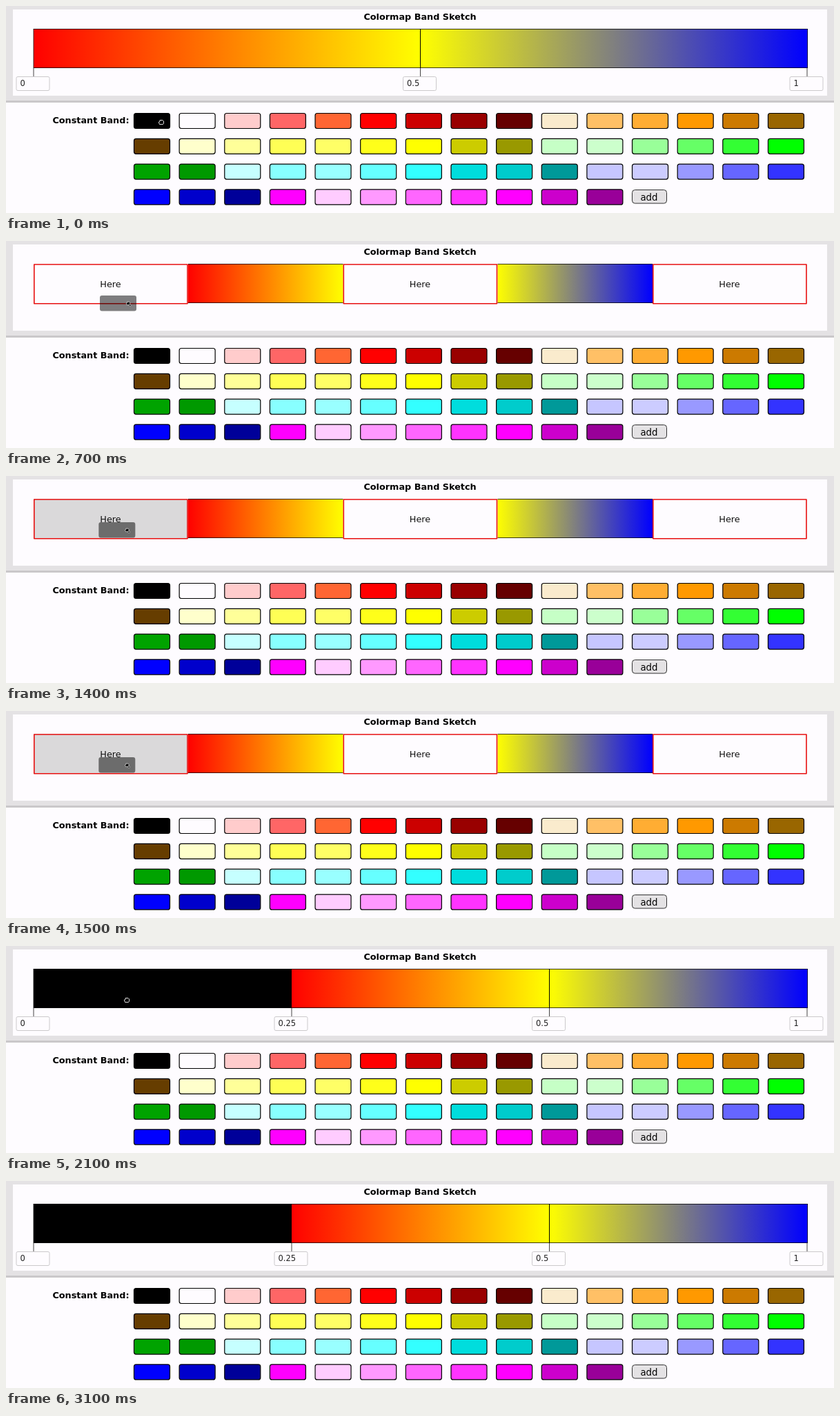
Write an HTML page with a canvas that moves like this. It is 1200 by 300 pixels and loops after 3.2 s.

```html
<!DOCTYPE html>
<html lang="en">
<head>
<meta charset="utf-8">
<title>Colormap Band Sketch</title>
<style>
html, body { margin: 0; width: 100%; height: 100%; overflow: hidden; background: #fefcff; }
canvas { display: block; }
</style>
</head>
<body>
<canvas id="stage" width="1200" height="300"></canvas>
<script>
const ctx = document.getElementById('stage').getContext('2d');
const LOOP = 3200, STEP = 100;
const WHITE = '#fefcff', RED = '#ff0000', YELLOW = '#ffff00', BLUE = '#0000ff';
const FONT = '"DejaVu Sans", sans-serif';
const SWATCH = { x: 185, y: 155, w: 53, h: 23, dx: 65.64, dy: 36.8 };

const palette = [
  '#000 #fefcff #fcc #f66 #f63 #f00 #c00 #900 #600 #faebcd #ffc066 #ffad33 #f90 #cc7a00 #960',
  '#663d00 #ffc #ff9 #ff5 #ff6 #ffff1a #ff0 #cc0 #990 #c6ffc6 #cfc #9f9 #6f6 #3f3 #0f0',
  '#00a300 #090 #c6ffff #8ff #9ff #6ff #3ff #0dd #0cc #099 #c6c6ff #ccf #99f #66f #33f',
  '#00f #00c #009 #f0f #fcf #f9f #f6f #f3f #f0f #c0c #909'
].map(row => row.split(' '));

// Pointer path: time, x, y
const path = [
  [0, 225, 168], [300, 225, 168], [400, 214, 151], [500, 199, 130], [600, 186, 108],
  [700, 177, 90], [800, 176, 85], [900, 176, 80], [1000, 175.5, 78], [2300, 175, 78],
  [2400, 165, 78], [2500, 130, 80], [2600, 80, 83], [2700, 30, 88], [2800, -20, 93]
];
const DRAG = 300, HOVER = 800, DROP = 1600, POINT = 2400;

function pointerAt(t) {
  const i = path.findIndex(p => p[0] > t);
  if (i < 0) return path[path.length - 1].slice(1);
  const [t0, x0, y0] = path[i - 1], [t1, x1, y1] = path[i];
  const k = (t - t0) / (t1 - t0);
  return [x0 + (x1 - x0) * k, y0 + (y1 - y0) * k];
}

function rect(x, y, w, h, fill) {
  ctx.fillStyle = fill;
  ctx.fillRect(x, y, w, h);
}

function box(x, y, w, h, r, fill, stroke, line = 1) {
  ctx.beginPath();
  ctx.roundRect(x, y, w, h, r);
  ctx.fillStyle = fill;
  ctx.fill();
  if (!stroke) return;
  ctx.strokeStyle = stroke;
  ctx.lineWidth = line;
  ctx.stroke();
}

function text(str, x, y, size, align = 'left', weight = 'normal', color = '#000') {
  ctx.font = `${weight} ${size}px ${FONT}`;
  ctx.textAlign = align;
  ctx.fillStyle = color;
  ctx.fillText(str, x, y);
}

function gradient(x0, x1, from, to, bottom = 90) {
  const g = ctx.createLinearGradient(x0, 0, x1, 0);
  g.addColorStop(0, from);
  g.addColorStop(1, to);
  rect(x0, 33, x1 - x0, bottom - 33, g);
  rect(x0, 33, x1 - x0, 1, 'rgba(0,0,0,.75)');
  rect(x0, bottom - 1, x1 - x0, 1, 'rgba(0,0,0,.75)');
}

function handle(x, label, line) {
  rect(x, 90, 1, 12, '#444');
  if (line) rect(x, 33, 1, 57, '#000');
  box(x - 24.5, 102.5, 48, 20, 2, WHITE, '#cbc9cb');
  text(label, x - 19, 116, 11.5, 'left', 'normal', '#222');
}

function drawBar(dropped) {
  const mid = dropped ? 787 : 600;
  const start = dropped ? 414 : 40;
  if (dropped) rect(40, 33, 374, 57, '#000');
  gradient(start, mid, RED, YELLOW);
  gradient(mid, 1162, YELLOW, BLUE);
  rect(39.5, 33, 1, 57, 'rgba(0,0,0,.75)');
  rect(1161, 33, 1, 57, 'rgba(0,0,0,.75)');
  handle(39.5, '0');
  if (dropped) handle(413.5, '0.25');
  handle(mid, '0.5', true);
  handle(1160.5, '1');
}

function drawTargets(hover) {
  gradient(263, 489, RED, YELLOW);
  gradient(712, 937, YELLOW, BLUE);
  [40, 488.5, 937].forEach((x, i) => {
    ctx.fillStyle = hover && i === 0 ? '#dad9da' : WHITE;
    ctx.fillRect(x, 33, 224, 58);
    ctx.strokeStyle = '#e81010';
    ctx.lineWidth = 1.6;
    ctx.strokeRect(x + .8, 34, 222.2, 56.8);
    text('Here', x + 111.5, 67, 12.8, 'center', 'normal', '#111');
  });
}

function drawPanel() {
  rect(0, 0, 1200, 300, WHITE);
  rect(0, 0, 1200, 138, '#e4e2e4');
  rect(10, 5, 1180, 125, WHITE);
  rect(0, 137, 1200, 3, '#cac8ca');
  text('Colormap Band Sketch', 600, 20, 12.8, 'center', 'bold');
  text('Constant Band:', 178.5, 170, 12.8, 'right', 'bold');
  const { x, y, w, h, dx, dy } = SWATCH;
  palette.forEach((row, r) => row.forEach((color, c) => {
    box(x + c * dx + .5, y + r * dy + .5, w - 1, h - 1, 3, color, '#000', 1.2);
  }));
  box(907.5, 266.5, 50, 19.5, 4, '#e4e2e4', '#333');
  text('add', 932, 282, 13.33, 'center');
}

function outline(points, x, y, fill) {
  ctx.beginPath();
  points.forEach(([px, py]) => ctx.lineTo(x + px, y + py));
  ctx.closePath();
  ctx.fillStyle = fill;
  ctx.strokeStyle = '#f4f4f4';
  ctx.lineWidth = .9;
  ctx.lineJoin = 'round';
  ctx.fill();
  ctx.stroke();
}

const fist = [[-2, -2.5], [2, -2.5], [3.5, -1], [3.5, 2], [2.5, 3.5], [-2.5, 3.5], [-3.5, 1], [-3.5, 0], [-2, -.5]];
const finger = [[-2, -3.5], [-1, -4], [0, -1], [3, 0], [3.5, 2], [2.5, 4], [-1, 4], [-3.5, 1], [-2.5, .5], [-1, 1.5]];

function drawPointer(t, x, y) {
  if (t >= DRAG && t < DROP) {
    ctx.save();
    ctx.translate(x, y);
    ctx.scale(.75, .75);
    outline(fist, 0, 0, '#000');
    ctx.restore();
    box(x + 1.5, y + 2, 2.5, 2.5, 1, '#111', '#ddd', .6);
  } else {
    outline(t >= POINT ? finger : fist, x, y, '#000');
  }
}

function draw(t) {
  const [x, y] = pointerAt(t);
  const dragging = t >= DRAG && t < DROP;
  drawPanel();
  if (dragging) {
    drawTargets(t >= HOVER);
    box(x - 41, y - 13 + (y < 150 ? 2 : 0), 53, 22.5, 3, 'rgba(0,0,0,.5)');
  } else {
    drawBar(t >= DROP);
  }
  drawPointer(t, x, y);
}

const begin = performance.now();
function tick() {
  const t = (performance.now() - begin) % LOOP;
  draw(Math.floor(t / STEP) * STEP);
  requestAnimationFrame(tick);
}
tick();
</script>
</body>
</html>
```
